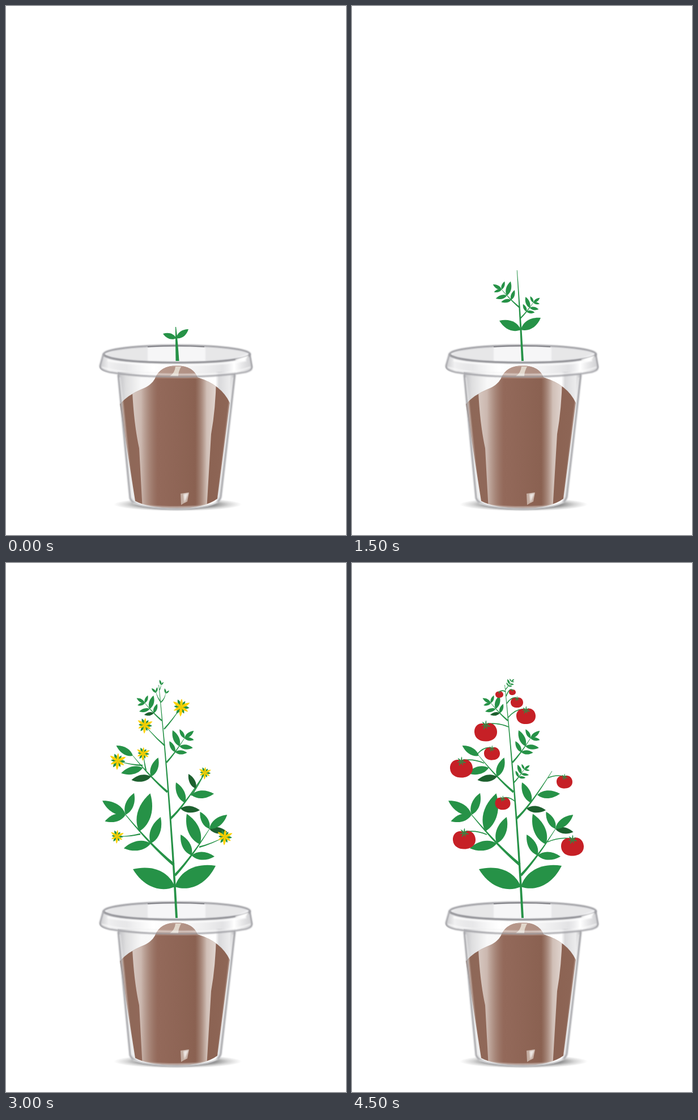
These frames come from a looping animation (600 px wide and 933 px high, 5 s). An HTML page:

```html
<!DOCTYPE html>
<html lang="en">
<head>
<meta charset="utf-8">
<title>Growing tomato plant</title>
<style>
  html, body { margin: 0; width: 100%; height: 100%; overflow: hidden; background: #fff; }
  svg { display: block; width: 100vw; height: 100vh; }
</style>
</head>
<body>
<svg viewBox="0 0 600 933">
  <defs>
    <radialGradient id="shadow">
      <stop offset=".55" stop-color="#555" stop-opacity=".75"/>
      <stop offset=".8" stop-color="#777" stop-opacity=".3"/>
      <stop offset="1" stop-color="#888" stop-opacity="0"/>
    </radialGradient>
    <linearGradient id="glass">
      <stop offset="0" stop-color="#bdbdc1"/>
      <stop offset=".07" stop-color="#dededf"/>
      <stop offset=".2" stop-color="#f8f8f8"/>
      <stop offset=".65" stop-color="#fcfcfc"/>
      <stop offset=".83" stop-color="#fff"/>
      <stop offset=".86" stop-color="#d9d9db"/>
      <stop offset=".95" stop-color="#ececed"/>
      <stop offset="1" stop-color="#b4b4b8"/>
    </linearGradient>
    <linearGradient id="soil">
      <stop offset="0" stop-color="#8d6757"/>
      <stop offset=".35" stop-color="#93695a"/>
      <stop offset=".7" stop-color="#8a6151"/>
      <stop offset="1" stop-color="#8e6656"/>
    </linearGradient>
    <linearGradient id="shineLeft">
      <stop offset="0" stop-color="#efe9e5" stop-opacity=".75"/>
      <stop offset=".35" stop-color="#e5dad4" stop-opacity=".7"/>
      <stop offset="1" stop-color="#b9a094" stop-opacity="0"/>
    </linearGradient>
    <linearGradient id="shineRight">
      <stop offset="0" stop-color="#c5b0a5" stop-opacity="0"/>
      <stop offset=".55" stop-color="#eee7e2" stop-opacity=".7"/>
      <stop offset="1" stop-color="#f7f3f0" stop-opacity=".8"/>
    </linearGradient>
    <linearGradient id="band">
      <stop offset="0" stop-color="#a9a9ad" stop-opacity=".65"/>
      <stop offset=".06" stop-color="#e6e6e8" stop-opacity=".6"/>
      <stop offset=".18" stop-color="#bcbcc0" stop-opacity=".35"/>
      <stop offset=".35" stop-color="#fff" stop-opacity=".25"/>
      <stop offset=".6" stop-color="#d6d6d8" stop-opacity=".25"/>
      <stop offset=".8" stop-color="#c6c6ca" stop-opacity=".5"/>
      <stop offset=".88" stop-color="#fff" stop-opacity=".8"/>
      <stop offset="1" stop-color="#b5b5b9" stop-opacity=".65"/>
    </linearGradient>
    <clipPath id="soilClip">
      <path id="soilShape" d="M201 702Q215 686 239 676Q256 670 263 657Q272 634 302 634Q330 635 338 655Q380 668 395 700L373 869Q350 886 302 886Q252 886 228 873Z"/>
    </clipPath>
    <filter id="soft"><feGaussianBlur stdDeviation=".8"/></filter>
  </defs>

  <ellipse cx="303" cy="879" rx="113" ry="12" fill="url(#shadow)"/>
  <path d="M197 645L219 870Q225 887 302 888Q374 887 379 867L405 645Z" fill="url(#glass)"/>
  <use href="#soilShape" fill="url(#soil)"/>
  <g clip-path="url(#soilClip)">
    <path d="M262 657Q272 634 302 634T340 657Z" fill="#a37968"/>
    <path d="M299 636H309Q304 645 304 653H289Q298 647 299 636Z" fill="#e0d2c2"/>
    <path d="M222 655Q224 730 235 780L241 890H268V655Z" fill="url(#shineLeft)"/>
    <path d="M334 655H371Q370 710 362 755L354 890H334Z" fill="url(#shineRight)"/>
  </g>
  <path d="M308 860L323 858L320 874Q313 877 309 880Z" fill="#e8ddd6" opacity=".6"/>
  <path d="M313 861L322 859L315 876Z" fill="#fff" opacity=".7" filter="url(#soft)"/>
  <g fill="none" filter="url(#soft)">
    <path d="M198 650L219 868Q225 887 302 887Q374 887 379 866L404 650" stroke="#a5a5a9" stroke-width="3"/>
    <path d="M201 655L223 867M400 655L375 866" stroke="#fff" stroke-opacity=".55" stroke-width="2"/>
    <path d="M224 877Q250 884 302 884T374 875" stroke="#eee" stroke-opacity=".65" stroke-width="2"/>
  </g>
  <ellipse cx="301.500" cy="614" rx="128.500" ry="15" fill="#f6f6f7"/>
  <path d="M176 616Q185 603 250 600V628Q200 626 176 616ZM352 602Q415 604 426 613Q405 625 352 627Z" fill="#d5d5d8" opacity=".45" filter="url(#soft)"/>
  <ellipse cx="301.500" cy="614" rx="129" ry="15.500" fill="none" stroke="#97979c" stroke-width="3" filter="url(#soft)"/>
  <path d="M250 601Q301 598 350 601" fill="none" stroke="#77777d" stroke-width="1.500"/>

  <g id="plant"></g>

  <path d="M172 614Q185 629 301.500 629.500T431 614L435 636Q435 645 415 647Q370 654 301 654T183 647Q165 644 165 636Z" fill="url(#band)"/>
  <g fill="none" filter="url(#soft)">
    <path d="M173 616Q190 629 301.500 629T430 616" stroke="#8d8d92" stroke-width="2.500"/>
    <path d="M179 625Q220 633 301 633T424 625" stroke="#fff" stroke-width="3" opacity=".75"/>
    <path d="M172 613L166 634Q165 642 183 646Q230 654 301 654T415 647Q435 645 434 636L430 613" stroke="#a0a0a5" stroke-width="2.500"/>
    <path d="M169 637Q205 649 301 650T431 637" stroke="#fff" stroke-width="2" opacity=".7"/>
    <path d="M405 624L428 617L420 626Z" fill="#fff" stroke="#fff"/>
  </g>
</svg>

<script>
const GREEN = "#269247", DARK = "#1d602f", YELLOW = "#ffd100", LIME = "#9aca3c", RED = "#c62026";
const FRAME_MS = 500;

const shape = (d, fill = GREEN) => `<path d="${d}" fill="${fill}"/>`;

function leaf(x, y, tipX, tipY, fill = GREEN, fat = .23) {
  const dx = tipX - x, dy = tipY - y;
  const at = (u, v) => `${x + dx * u - dy * v} ${y + dy * u + dx * v}`;
  return shape(`M${x} ${y}C${at(.25, fat)} ${at(.65, fat)} ${tipX} ${tipY}` +
    `C${at(.65, -fat)} ${at(.25, -fat)} ${x} ${y}Z`, fill);
}

// Curved shoot that narrows to a point
function shoot(x, y, cx, cy, tipX, tipY, width) {
  const len = Math.hypot(cx - x, cy - y) || 1;
  const nx = -(cy - y) / len * width / 2, ny = (cx - x) / len * width / 2;
  return shape(`M${x + nx} ${y + ny}Q${cx + nx * .7} ${cy + ny * .7} ${tipX + nx * .2} ${tipY + ny * .2}` +
    `L${tipX - nx * .2} ${tipY - ny * .2}Q${cx - nx * .7} ${cy - ny * .7} ${x - nx} ${y - ny}Z`);
}

function stem(tipY, width = 4) {
  const rise = 625 - tipY;
  return shoot(301, 626, 301 - .026 * rise, 625 - rise / 2,
    301 - .052 * rise - .00006 * rise * rise, tipY, width);
}

// Leaflets: place on the twig, reach along it, reach to its inner side
const LEAFLETS = [[.45, .175, .34], [.45, .22, -.354], [.69, .285, .47], [.69, .22, -.41],
  [1, .14, .306], [1, .14, -.28], [1, .378, -.1]];

function sprig(x, y, endX, endY, keep = "0123456", dark = "") {
  const dx = endX - x, dy = endY - y, side = dx < 0 ? 1 : -1;
  const at = (u, v) => [x + dx * u - side * dy * v, y + dy * u + side * dx * v];
  const width = 1.2 + Math.hypot(dx, dy) * .03;
  return shoot(x, y, ...at(.4, -.045), endX, endY, width) +
    LEAFLETS.map(([node, along, inner], i) => !keep.includes(i) ? "" :
      leaf(...at(node, node < 1 ? -.025 : 0), ...at(node + along, inner),
        dark.includes(i) ? DARK : GREEN)).join("");
}

const seedLeaves = (x, y, leftX, leftY, rightX, rightY) =>
  leaf(x, y, leftX, leftY, GREEN, .26) + leaf(x, y, rightX, rightY, GREEN, .26);

function star(x, y, count, r, turn, fill, fat) {
  let out = "";
  for (let i = 0; i < count; i++) {
    const a = turn + i * 2 * Math.PI / count, len = r * (i % 2 ? .86 : 1);
    out += leaf(x, y, x + len * Math.cos(a), y + len * Math.sin(a), fill, fat);
  }
  return out;
}

const stalk = (x, y, endX, endY, lift) =>
  `<path d="M${x} ${y}Q${(x + endX) / 2} ${Math.min(y, endY) - lift} ${endX} ${endY}" fill="none" stroke="${GREEN}" stroke-width="1.6"/>`;

const flower = ([x, y, r, fromX, fromY]) =>
  shoot(fromX, fromY, (fromX + x) / 2, (fromY + y) / 2 + 3, x, y, 2.4) +
  star(x, y, 6, r * .86, .1, GREEN, .24) + star(x, y, 6, r, -.45, YELLOW, .2);

function fruit([x, y, rx, fromX, fromY], fill, size) {
  const top = y - rx * .68, r = rx * size;
  return stalk(fromX, fromY, x, top, 4) +
    `<g transform="translate(${x} ${top + r * .68}) scale(${r} ${r * .83}) rotate(-4)">` +
    shape("M0-.84C.5-1.12 1-.7 1-.02C1 .7 .5 1 0 1S-1 .7-1-.02C-1-.7-.5-1.12 0-.84Z", fill) + "</g>" +
    star(x, top + r * .08, 7, r * .44, -1.5, GREEN, .16);
}

// x, y, radius, then where the stalk starts
const FLOWERS = [[309, 254, 17, 279, 293], [245, 286, 15, 280, 322], [197, 349, 16, 241, 357],
  [242, 336, 13, 247, 366], [351, 370, 12, 327, 410], [196, 482, 13, 237, 478], [386, 483, 15, 341, 501]];
const FRUITS = [[236, 298, 20, 276, 289], [193, 362, 20, 233, 353], [247, 336, 14, 221, 337],
  [198, 488, 20, 238, 479], [389, 500, 20, 345, 492], [375, 386, 14, 346, 379], [307, 270, 17, 275, 273],
  [291, 246, 11, 273, 248], [260, 232, 7, 271, 227], [283, 228, 6, 272, 235], [266, 424, 13.5, 287, 420]];

const grown = () => seedLeaves(298, 571, 224, 540, 370, 534) +
  sprig(296, 532, 211, 444, "012456") + sprig(298, 551, 359, 469, "012456", "5") +
  sprig(285, 404, 224, 340, "0136", "1") + sprig(283, 352, 315, 309) +
  sprig(275, 278, 245, 247, "0123456", "1") +
  shoot(290, 451, 312, 432, 353, 367, 4) + leaf(316, 423, 300, 387) +
  leaf(327, 409, 367, 407) + leaf(308, 433, 342, 436, DARK);

const fruiting = (fill, size = 1, topY = 209) => stem(215) + grown() +
  sprig(271, 223, 281, topY) + sprig(285, 388, 304, 364) +
  FRUITS.map(f => fruit(f, fill, size)).join("");

const stages = [
  shoot(302.5, 626, 301, 590, 299.5, 566, 6) + seedLeaves(300.5, 586, 277, 578, 322, 570),

  stem(502) + seedLeaves(298.5, 571, 271, 563, 325, 554),

  stem(508) + seedLeaves(298, 571, 267, 559, 328, 551) +
    sprig(296, 533, 282, 520) + sprig(297, 552, 309, 537),

  stem(466) + seedLeaves(298, 571, 260, 555, 333, 550) +
    sprig(296, 532, 264, 500) + sprig(297, 551, 320, 523),

  stem(394) + seedLeaves(298, 571, 254, 551, 338, 550) +
    sprig(296, 532, 246, 482) + sprig(297, 551, 331, 509) +
    sprig(289, 445, 264, 417) + sprig(291, 475, 315, 444),

  stem(320) + seedLeaves(298, 571, 238, 543, 353, 542) +
    sprig(296, 532, 228, 459) + sprig(298, 550, 346, 489) +
    sprig(285, 404, 246, 361) + sprig(290, 450, 335, 392) +
    shoot(280, 335, 273, 329, 267, 319, 2) + leaf(267, 320, 270, 309) + leaf(267, 320, 257, 315) +
    shoot(282, 367, 290, 359, 295, 350, 2) + leaf(295, 351, 292, 339) + leaf(295, 351, 307, 350),

  stem(215) + grown() + leaf(335, 398, 322, 372, DARK) +
    shoot(274, 246, 268, 240, 264, 226, 1.8) + leaf(265, 229, 257, 221) + leaf(265, 228, 267, 219) +
    shoot(274, 245, 280, 240, 282, 229, 1.8) + leaf(282, 230, 288, 225) + leaf(282, 230, 280, 221) +
    shoot(271, 224, 273, 220, 274, 214, 1.5) + leaf(274, 215, 271, 206) + leaf(274, 215, 278, 210) +
    FLOWERS.map(flower).join(""),

  fruiting(LIME, .6, 205),
  fruiting(LIME),
  fruiting(RED)
];

const plant = document.getElementById("plant");
const start = performance.now();
let shown = -1;

function draw() {
  const index = Math.floor((performance.now() - start) / FRAME_MS) % stages.length;
  if (index !== shown) plant.innerHTML = stages[shown = index];
  requestAnimationFrame(draw);
}
draw();
</script>
</body>
</html>
```
